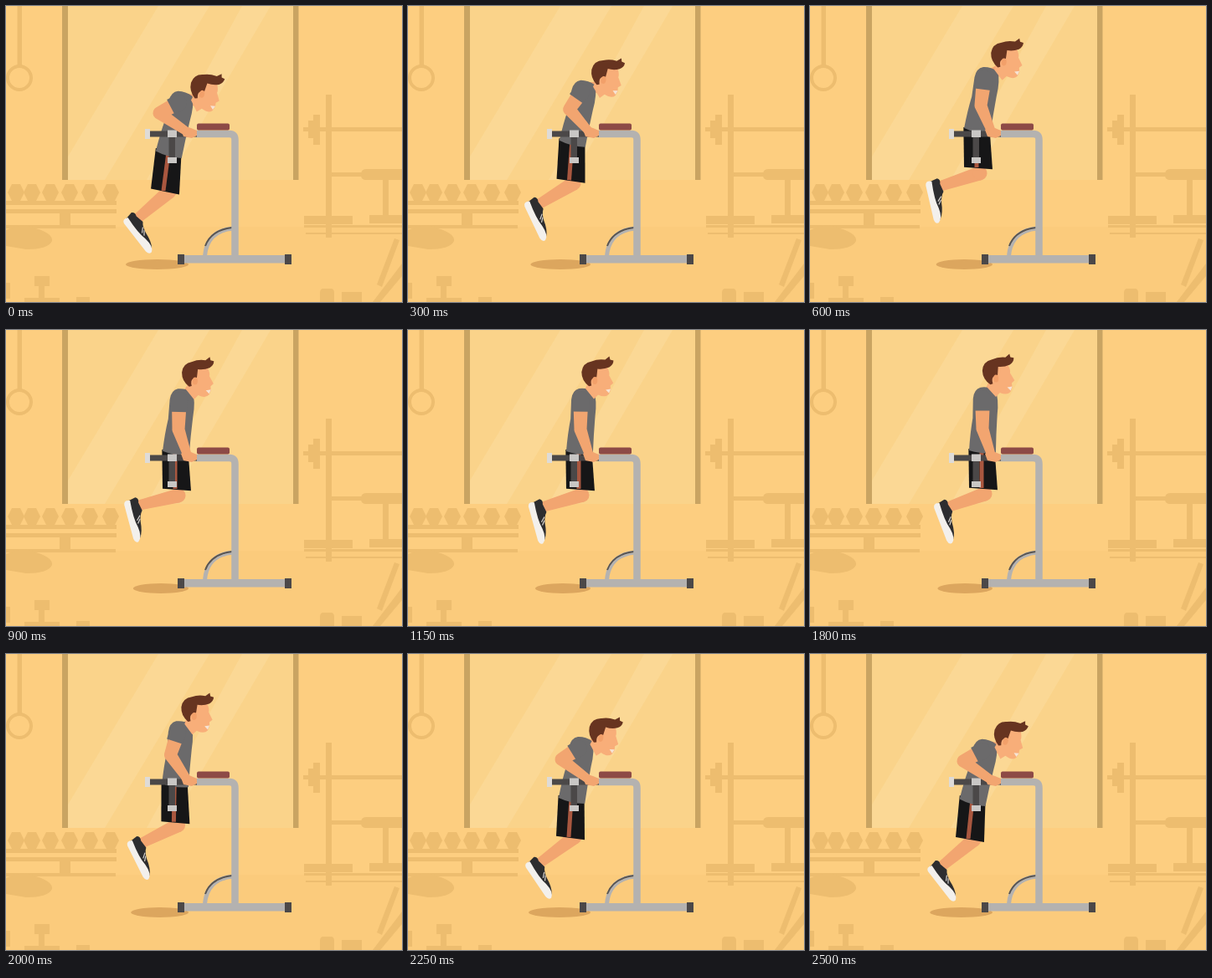
Animation, 473 px wide and 354 px high, one loop 2550 ms. Source, as an HTML page:

```html
<!DOCTYPE html>
<html lang="en">
<head>
<meta charset="utf-8">
<title>Dip machine</title>
<style>
html, body { margin: 0; width: 100%; height: 100%; overflow: hidden; background: #fdce80; }
svg { display: block; width: 473px; height: 354px; }
</style>
</head>
<body>
<svg viewBox="0 0 473 354" width="473" height="354">
  <rect width="473" height="354" fill="#fdce80"/>
  <rect y="264" width="473" height="90" fill="#fbcb7c"/>

  <!-- window -->
  <rect x="68" width="281" height="208" fill="#fad38a"/>
  <path d="M182 0H243L118 208H74V180ZM282 0H316L194 208H168Z" fill="#fcdc9c" opacity=".65"/>
  <path d="M67 0H74V208H67ZM343 0H349.500V208H343Z" fill="#c9a462"/>

  <!-- gym in the back -->
  <g fill="#edbd6f">
    <path d="M13.500 0H19V72H13.500Z"/>
    <circle cx="16" cy="86" r="14" fill="none" stroke="#edbd6f" stroke-width="4"/>
    <g id="weights"></g>
    <path d="M0 233H132V238H0ZM0 243H132V248H0ZM64 248H77V262H64ZM0 262H131V266H0Z"/>
    <path d="M0 268Q20 258 36 266Q56 272 55 281Q51 291 24 291L0 287Z"/>
    <path d="M34 323H52V335H46V349H64V354H22V349H39V335H34ZM0 331H5V350H0ZM84 348H100V354H84Z"/>
    <path d="M382 106H389V251H414V261H389V277H382V261H356V251H382Z"/>
    <path d="M355 145H473V150H355ZM361 137H367V158H361ZM367 130H375V166H367Z"/>
    <path d="M389 199H426V204H389ZM430 195H473V208H430Q424 208 424 202Q424 195 430 195ZM450 208H457V250H473V260H434V250H450Z"/>
    <path d="M356 262H473V265H356ZM358 271H473V273H358Z"/>
    <path d="M464 278L470 280L449 336L443 333ZM473 308V323L447 354H438Z"/>
    <path d="M379 338H388Q392 338 392 343V354H375V343Q375 338 379 338ZM401 342H425V354H401Z"/>
  </g>

  <ellipse id="shadow" cy="309" ry="6" fill="#dca65e"/>

  <!-- frame of the machine -->
  <path d="M237.500 299Q240 269 271 266" fill="none" stroke="#b4b2b0" stroke-width="5"/>
  <path d="M238 287Q245 268 270 265" fill="none" stroke="#595552" stroke-width="2"/>
  <path d="M227 153H267Q273.500 153 273.500 160V300" fill="none" stroke="#b4b2b0" stroke-width="8.500"/>
  <rect x="212" y="298" width="122" height="9.500" fill="#b4b2b0"/>
  <path d="M205 297H213V309H205ZM333 297H341V309H333Z" fill="#4b4848"/>
  <rect x="228" y="140.500" width="39" height="8" rx="2" fill="#8d4a46"/>

  <!-- athlete -->
  <path id="leg" fill="#f2a570"/>
  <circle id="knee" r="8.500" fill="#f2a570"/>
  <g id="shoe">
    <path d="M0 -4L-2 -14Q0 -18 5 -16L15 -18Q20 -13 33 -12Q45 -10 49 -4L47 -2H1Z" fill="#2d2d2f"/>
    <path d="M0 -7Q22 -5 33 -8Q46 -10 50 -4Q51 0 45 1H3Q-3 0 0 -7Z" fill="#f3f0ec"/>
    <path d="M20 -14L25 -9M24 -13L29 -9" stroke="#d8d4d0" stroke-width="1.200"/>
  </g>
  <path id="shorts" fill="#161617"/>
  <path id="stripe" fill="none" stroke="#a9573f" stroke-width="5"/>
  <path id="neck" fill="none" stroke="#f2a570" stroke-width="13"/>
  <path id="shirt" fill="#6b6a6b" d="M12 -8Q3 -12 -6 -10Q-14 -7 -14 4L-13 27Q-15 45 -15 66Q0 70 17 67Q16 45 16 22Q17 2 12 -8Z"/>
  <g id="head">
    <path d="M-5 -9L12 -11Q16 -4 15 0L20 9L16.500 12L17 17L15 22Q11 27 2 23L-3 28L-13 16Z" fill="#f8ae79"/>
    <path d="M-9 13Q-18 6 -18 -4Q-17 -15 -6 -17Q1 -20 10 -19L15 -23L16 -19L20 -18Q20 -13 15 -10Q8 -7 1 -8L0 2L-4 3Q-8 5 -6 12Z" fill="#673420"/>
    <ellipse cx="-2" cy="6" rx="3" ry="4.500" fill="#f2a06a"/>
    <path d="M17 16L11 17L15 21Z" fill="#f6e4d4"/>
  </g>

  <!-- handle -->
  <rect x="171" y="149.500" width="57" height="7" fill="#4b4848"/>
  <path d="M166 147H172V159H166Z" fill="#dedbd8"/>
  <rect x="194.500" y="156" width="7.500" height="26" fill="#4b4848"/>
  <path d="M193 148.500H204V157H193ZM193 181H204V188H193Z" fill="#c9c7c5"/>

  <path id="arm" fill="#f2a570"/>
  <path id="sleeve" fill="#6b6a6b"/>
  <path d="M209 148Q214 143 221 146L228 149V155L222 158L212 156Z" fill="#f2a570"/>
</svg>
<script>
const LOOP = 2550, STEP = 50;
const el = id => document.getElementById(id);
const set = (id, attrs) => { for (const k in attrs) el(id).setAttribute(k, attrs[k]); };

el('weights').innerHTML = [12, 31, 53, 76, 100, 125].map(x =>
  `<path d="M${x - 10} 223l5 -10h10l5 10l-5 10h-10z"/>`).join('');

// One track per joint; each has a value at every key time.
const times = [0, 600, 900, 1400, 1800, 2250, 2500, 2550];
const tracks = {
  headX: [237.5, 234, 228, 224, 224, 233.5, 237, 237.5],
  headY: [100, 61, 55, 54, 52, 95, 99, 100],
  headA: [14, 3, 1, 0, -2, 12, 14, 14],
  chestX: [209, 211, 210, 209, 209, 207, 209, 209],
  chestY: [113, 84, 81, 80, 79, 110, 113, 113],
  waistX: [194, 199, 202, 205, 205, 195, 194, 194],
  waistY: [175, 148, 146, 146, 145, 173, 174, 175],
  hemX: [190, 201, 204, 207, 207, 194, 191, 190],
  hemY: [222, 194, 191, 191, 190, 220, 222, 222],
  kneeX: [195, 203, 206, 209, 209, 199, 196, 195],
  kneeY: [222, 200, 198, 197, 196, 219, 222, 222],
  footX: [156, 154, 157, 162, 164, 156, 156, 156],
  footY: [255, 216, 210, 214, 212, 251, 255, 255],
  footA: [52, 77, 75, 74, 69, 56, 52, 52],
  elbowX: [183, 204, 206, 206, 206, 183, 183, 183],
  elbowY: [128, 119, 119, 119, 118, 126, 128, 128]
};

// Monotone cubic interpolation
function sample(v, t) {
  let i = 0;
  while (i < times.length - 2 && t >= times[i + 1]) i++;
  const rise = k => (v[k + 1] - v[k]) / (times[k + 1] - times[k]);
  const slope = k => {
    if (k === 0 || k === times.length - 1) return 0;
    const a = rise(k - 1), b = rise(k);
    return a * b > 0 ? 2 * a * b / (a + b) : 0;
  };
  const h = times[i + 1] - times[i], u = (t - times[i]) / h, w = 1 - u;
  return v[i] * (1 + 2 * u) * w * w + v[i + 1] * u * u * (3 - 2 * u) +
    h * (slope(i) * u * w * w - slope(i + 1) * u * u * w);
}

const deg = r => r * 180 / Math.PI;
const path = pts => 'M' + pts.map(p => p.map(n => n.toFixed(2)).join(' ')).join('L') + 'Z';

// Points across the line a-b, half-width r, at fraction f
function across(a, b, f, r) {
  const dx = b[0] - a[0], dy = b[1] - a[1], l = Math.hypot(dx, dy);
  const x = a[0] + dx * f, y = a[1] + dy * f;
  return [[x + dy / l * r, y - dx / l * r], [x - dy / l * r, y + dx / l * r]];
}

// Tapered limb with round ends
function limb(a, b, ra, rb) {
  const [a1, a2] = across(a, b, 0, ra), [b1, b2] = across(a, b, 1, rb);
  return `M${a1}L${b1}A${rb} ${rb} 0 0 1 ${b2}L${a2}A${ra} ${ra} 0 0 1 ${a1}Z`;
}

function draw(t) {
  const p = {};
  for (const k in tracks) p[k] = sample(tracks[k], t);
  const at = name => [p[name + 'X'], p[name + 'Y']];
  const chest = at('chest'), waist = at('waist'), hem = at('hem');
  const knee = at('knee'), foot = at('foot'), elbow = at('elbow');

  const lean = deg(Math.atan2(chest[0] - waist[0], waist[1] - chest[1]));
  set('shirt', { transform: `translate(${chest}) rotate(${lean})` });
  set('head', { transform: `translate(${at('head')}) rotate(${p.headA})` });
  set('neck', { d: `M${p.headX - 5} ${p.headY + 14}L${chest[0] + 5} ${chest[1] - 2}` });

  const [w1, w2] = across(waist, hem, -.08, 15.5), [h1, h2] = across(waist, hem, 1, 17);
  h1[1] += 2;
  h2[1] -= 2;
  set('shorts', { d: path([w1, h1, h2, w2]) });
  set('stripe', { d: `M${waist}L${hem[0] - 2} ${hem[1] - 1}` });

  const [k1, k2] = across(knee, foot, 0, 8.5), [f1, f2] = across(knee, foot, 1, 6);
  set('leg', { d: path([k1, f1, f2, k2]) });
  set('knee', { cx: knee[0], cy: knee[1] });
  set('shoe', { transform: `translate(${foot}) rotate(${p.footA}) translate(-8 14)` });

  const joint = [chest[0] - 3, chest[1] + 3], hand = [217, 151];
  set('arm', { d: limb(joint, elbow, 9, 7.5) + limb(elbow, hand, 7.5, 5) });
  const mid = [joint[0] + (elbow[0] - joint[0]) * .4, joint[1] + (elbow[1] - joint[1]) * .4];
  const [s1, s2] = across(joint, mid, 0, 10), [m1, m2] = across(joint, mid, 1, 10);
  set('sleeve', { d: `M${s1}L${m1}L${m2}L${s2}A10 10 0 0 1 ${s1}Z` });

  const left = 152 - 9 * (p.headY - 54) / 46;
  set('shadow', { cx: (left + 218) / 2, rx: (218 - left) / 2 });
}

function tick() {
  const t = performance.now() % LOOP;
  draw(t - t % STEP);
  requestAnimationFrame(tick);
}
tick();
</script>
</body>
</html>
```
